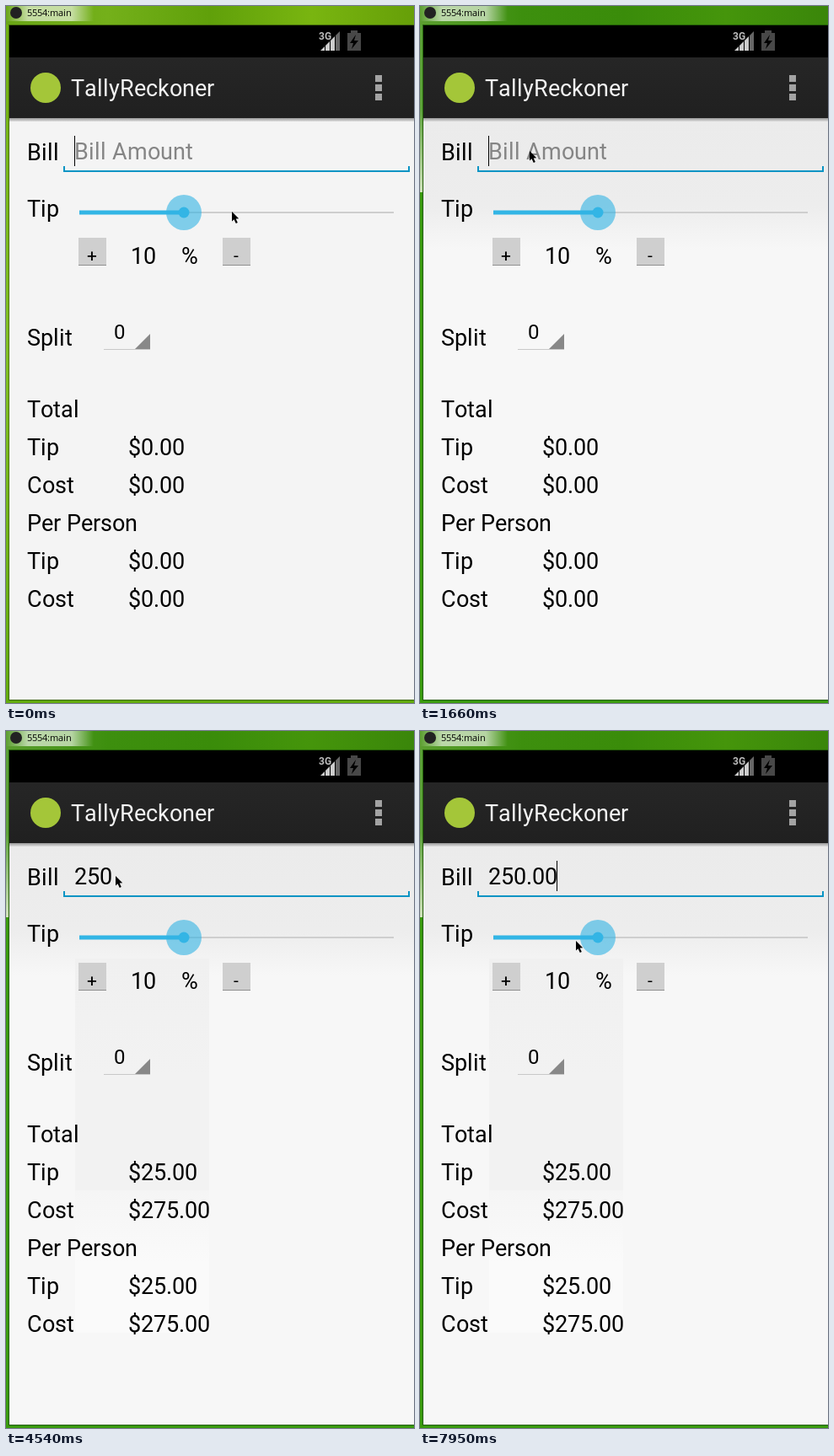
Animation, 484 px wide and 827 px high, one loop 8000 ms. Source, as an HTML page with a canvas:

```html
<!DOCTYPE html>
<html>
<head>
<meta charset="utf-8">
<style>
  html, body { margin: 0; height: 100%; overflow: hidden; }
  canvas { display: block; }
</style>
</head>
<body>
<canvas id="stage" width="484" height="827"></canvas>
<script>
const ctx = document.getElementById('stage').getContext('2d');
const LOOP = 8000;
const TICK = 140;
const CLICK_TIME = 1240;
const FOCUS_TIME = 1660;
const AMOUNT = '250.00';
const KEY_TIMES = [3370, 3830, 3950, 5440, 5750, 5870];
const BLUE = '#33b5e5';

function rect(x, y, w, h, fill) {
  ctx.fillStyle = fill;
  ctx.fillRect(x, y, w, h);
}

// Sets glyphs on whole pixels, without kerning, and returns the end of the line.
function text(str, x, y, { size = 27, color = '#000', font = 'Roboto', weight = 400 } = {}) {
  ctx.font = `${weight} ${size}px ${font}, sans-serif`;
  ctx.fillStyle = color;
  for (const glyph of str) {
    ctx.fillText(glyph, x, y);
    x += Math.round(ctx.measureText(glyph).width);
  }
  return x;
}

function circle(x, y, r, fill) {
  ctx.fillStyle = fill;
  ctx.beginPath();
  ctx.arc(x, y, r, 0, 7);
  ctx.fill();
}

function poly(points, fill) {
  ctx.fillStyle = fill;
  ctx.beginPath();
  points.forEach(([x, y]) => ctx.lineTo(x, y));
  ctx.closePath();
  ctx.fill();
}

function gradient(x0, y0, x1, y1, ...colors) {
  const g = ctx.createLinearGradient(x0, y0, x1, y1);
  colors.forEach((color, i) => g.addColorStop(i / (colors.length - 1), color));
  return g;
}

const vertical = (top, bottom, ...colors) => gradient(0, top, 0, bottom, ...colors);

// Progress from 0 to 1, advancing once per tick.
const glide = (t, start, steps) => Math.min(1, Math.max(0, Math.floor((t - start) / TICK) / steps));

function pointerAt(t) {
  const drift = glide(t, 420, 3), toBill = glide(t, 840, 4), toSlider = glide(t, 7250, 5);
  return [
    268 + 7 * drift - 145 * toBill + 55 * toSlider ** 3,
    244 + 2 * drift - 74 * (1 - (1 - toBill) ** 2) + 77 * toSlider ** 2 * (3 - 2 * toSlider)
  ].map(Math.round);
}

// The caret blinks, and each click or key press makes it solid again.
function caretVisible(t) {
  if (t < CLICK_TIME) return t < 280;
  const reset = [CLICK_TIME, ...KEY_TIMES].findLast(time => time <= t);
  return Math.floor(Math.max(0, t - reset - 60) / 480) % 2 === 0;
}

function drawFrame(focused) {
  if (focused) {
    rect(0, 0, 484, 827, '#399a0c');
    rect(0, 0, 484, 22, gradient(0, 0, 484, 0, '#5c9f30', '#3d8f0e', '#3a8c0a', '#45950b', '#3a860a'));
    rect(0, 22, 3, 199, vertical(22, 221, '#5aa036', '#5da33a', '#cfe2bb'));
  } else {
    rect(0, 0, 484, 827, vertical(0, 827, '#6fb010', '#7fbf22', '#62ab0b'));
    rect(0, 0, 484, 22, gradient(0, 0, 484, 12, '#6aa616', '#74b01a', '#60a00a', '#79b510', '#669f08'));
  }
  const glow = 'rgba(255,255,255,0)', white = 'rgba(255,255,255,.6)';
  rect(0, 0, 104, 18, gradient(0, 0, 104, 0, glow, white, white, white, glow));
  circle(12, 8, 7, '#222');
  text('5554:main', 25, 12, { size: 11, font: 'Open Sans' });
  rect(3, 22, 481, 802, 'rgba(0,0,0,.4)');
}

function drawBars() {
  rect(4, 23, 480, 38, '#000');
  text('3G', 371, 40, { size: 12, weight: 700, color: '#bbb' });
  for (let i = 0; i < 4; i++) {
    const x = 373 + 6 * i, top = 48 - 6 * i;
    poly([[x, top + 5], [x + 5, top], [x + 5, 53], [x, 53]], i < 3 ? '#ccc' : '#666');
  }
  rect(409, 29, 8, 4, '#484848');
  rect(405, 32, 16, 21, '#484848');
  poly([[415, 34], [408, 44], [412, 44], [410, 51], [418, 41], [413, 41]], '#000');

  rect(4, 61, 480, 72, vertical(61, 133, '#262626', '#202020'));
  circle(47, 97, 18, '#a4c639');
  text('TallyReckoner', 77, 107, { color: '#f3f3f3' });
  for (let i = 0; i < 3; i++) rect(438, 82 + 11 * i, 8, 8, '#a3a3a3');
}

function drawBackground(focused, bill) {
  rect(4, 133, 480, 690, focused ? '#f7f7f7' : '#f4f4f4');
  if (focused) rect(4, 133, 480, 157, vertical(133, 290, '#ebebeb', '#ececec', '#ededed', '#f7f7f7'));
  if (bill) {
    const width = Math.min(159, 124 + 15 * bill.length);
    rect(82, 270, width, 275, vertical(270, 545, '#f0f0f0', '#f2f2f2', '#f2f2f2'));
    rect(82, 545, width, 169, vertical(545, 714, '#f5f5f5', '#fafafa', '#fafafa'));
  }
  rect(4, 133, 480, 4, vertical(133, 137, '#999', '#dedede'));
}

function drawButton(x, label, labelX) {
  rect(x, 275, 33, 33, '#cfcfcf');
  rect(x, 307, 33, 1, '#8f8f8f');
  text(label, labelX, 303, { size: 21 });
}

function drawBillField(bill, caretOn) {
  text('Bill', 25, 183);
  const end = text(bill || 'Bill Amount', 81, 182, { color: bill ? '#000' : '#858585' });
  if (caretOn) rect(bill ? end - 1 : 81, 154, 1, 36, '#000');
  rect(68, 195, 411, 2, '#0a94c4');
  for (const x of [68, 477]) rect(x, 190, 2, 6, '#0a94c4');
}

function drawSlider() {
  text('Tip', 25, 250);
  rect(87, 244, 373, 2, '#cecece');
  rect(87, 242.5, 124, 5, BLUE);
  circle(211, 245, 21, 'rgba(51,181,229,.6)');
  circle(211, 245, 6.5, BLUE);
  drawButton(86, '+', 96);
  drawButton(257, '-', 270);
  text('10', 148, 306);
  text('%', 208, 306);
}

function drawSplit() {
  text('Split', 25, 403);
  text('0', 128, 395, { size: 24 });
  rect(116, 407, 55, 1, '#c8c8c8');
  poly([[171, 389], [171, 407], [153, 407]], '#888');
}

function drawSums(title, y, bill) {
  const tip = bill * .1;
  text(title, 25, y);
  [['Tip', tip], ['Cost', bill + tip]].forEach(([label, value], i) => {
    const rowY = y + 45 * (i + 1);
    text(label, 25, rowY);
    text('$' + value.toFixed(2), 145, rowY);
  });
}

function drawPointer(x, y) {
  ctx.save();
  ctx.translate(x, y);
  poly([[0, 0], [0, 11.5], [2.5, 9.3], [4.8, 14], [6.8, 13], [4.7, 8.5], [8.2, 8.2]], '#000');
  ctx.restore();
}

function render(now) {
  const t = now % LOOP;
  const focused = t >= FOCUS_TIME;
  const bill = AMOUNT.slice(0, KEY_TIMES.filter(time => time <= t).length);
  drawFrame(focused);
  drawBackground(focused, bill);
  drawBars();
  drawBillField(bill, caretVisible(t));
  drawSlider();
  drawSplit();
  drawSums('Total', 488, Number(bill));
  drawSums('Per Person', 623, Number(bill));
  drawPointer(...pointerAt(t));
  requestAnimationFrame(render);
}
requestAnimationFrame(render);
</script>
</body>
</html>
```
